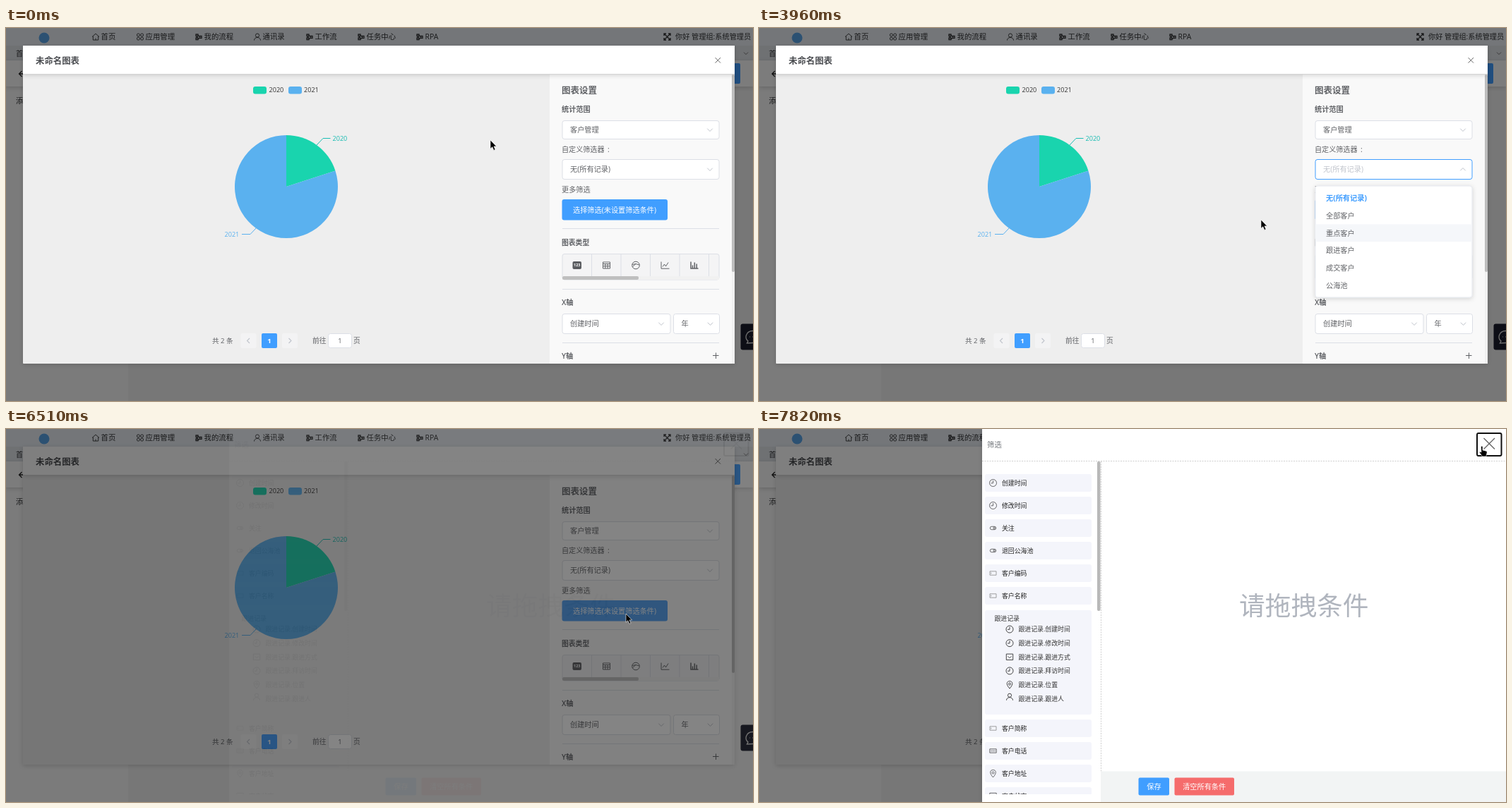
These frames come from a looping animation (1058x529 px, 8000 ms). An HTML page:

```html
<!DOCTYPE html>
<html lang="zh-CN">
<head>
<meta charset="utf-8">
<title>图表设置</title>
<style>
html, body { margin: 0; width: 100%; height: 100%; overflow: hidden; background: #fff; }
svg { display: block; width: 100%; height: 100%; }
text { font-family: "Open Sans", "Noto Sans CJK SC", "Noto Sans CJK", sans-serif; white-space: pre; }
</style>
</head>
<body>
<svg id="stage" viewBox="0 0 1058 529"></svg>
<script>
const LOOP = 8000;
const BLUE = '#409eff', INK = '#303133', TEXT = '#606266', LINE = '#dcdfe6', PALE = '#c0c4cc';

// Markup helpers: text is placed by its vertical centre
const text = (x, cy, size, str, fill = TEXT, more = '') =>
  `<text x="${x}" y="${cy + size * 0.37}" font-size="${size}" fill="${fill}" ${more}>${str}</text>`;
const rect = (x, y, w, h, fill, more = '') =>
  `<rect x="${x}" y="${y}" width="${w}" height="${h}" fill="${fill}" ${more}/>`;
const path = (d, stroke, width = 1, more = '') =>
  `<path d="${d}" fill="none" stroke="${stroke}" stroke-width="${width}" ${more}/>`;
const at = (x, y, body, more = '') => `<g transform="translate(${x} ${y})" ${more}>${body}</g>`;
const BOLD = 'font-weight="600"', MID = 'text-anchor="middle"';

const circle = (x, y, r) => `M${x - r} ${y}a${r} ${r} 0 1 0 ${2 * r} 0a${r} ${r} 0 1 0 ${-2 * r} 0`;
const box = (x, y, w, h) => `M${x} ${y}h${w}v${h}h${-w}z`;

// Line icons drawn around 0,0
const icons = {
  home: 'M-5 0L0 -4.5L5 0M-3.7 -1V4.5H3.7V-1M0 4.5V2',
  grid: circle(-2.6, -2.6, 2) + circle(2.6, -2.6, 2) + circle(-2.6, 2.6, 2) + circle(2.6, 2.6, 2),
  flow: 'M-4 -3.5h3v2.5h-3zM-4 1.5h3v2.5h-3zM-2.5 -1v3M1.5 -1h2.5v2.8h-2.5zM-1 -2L2 0M-1 3L2 1.5',
  user: circle(0, -2, 2.6) + 'M-4.5 5C-4.5 -.4 4.5 -.4 4.5 5',
  clock: circle(0, 0, 5) + 'M0 -3.3V.3H-3',
  toggle: 'M-2 -2.2H2a2.2 2.2 0 0 1 0 4.4H-2a2.2 2.2 0 0 1 0 -4.4' + circle(1.6, 0, 1.2),
  input: box(-4.5, -2.7, 9, 5.4) + 'M-2.8 -1V1',
  phone: box(-4.7, -2.7, 9.4, 5.4) + 'M-2.5 -1.2V1.2M0 -1.2V1.2M2.5 -1.2V1.2',
  pin: 'M0 5.5C-6 -1 -4 -5 0 -5S6 -1 0 5.5z' + circle(0, -1, 1.5),
  choice: box(-4.7, -4.2, 9.4, 8.4) + 'M-2.5 -1L0 1.5L2.5 -1',
  table: box(-5, -4.5, 10, 9) + 'M-5 -2H5M-5 1.2H5M-1.7 -2V4.5M1.7 -2V4.5',
  pie: circle(0, 0, 5.3) + 'M-5 -1L0 -2L5 -.5M-4.5 2L0 -2',
  chart: 'M-5.5 -5V4.7H6M-3.5 2L-1 -1.5L1 1.5L4.5 -4',
  bars: 'M-5 -5V4.5H5.5M-2.5 4V0M.3 4V-4M3.2 4V-2',
  expand: 'M-4.5 -4.5L4.5 4.5M4.5 -4.5L-4.5 4.5M-4.5 -1.5V-4.5H-1.5M1.5 -4.5H4.5V-1.5M4.5 1.5V4.5H1.5M-1.5 4.5H-4.5V1.5'
};
const icon = (name, x, y, color, width = 0.9) => at(x, y, path(icons[name], color, width));
const chevron = (x, y, id = '') =>
  at(x, y, `<path ${id} d="M-3.7 -1.8L0 2L3.7 -1.8" fill="none" stroke="${PALE}"/>`);
const select = (x, y, w, h, label) =>
  rect(x, y, w, h, '#fff', `stroke="${LINE}" rx="3"`) + text(x + 11, y + h / 2, 10.2, label) +
  chevron(x + w - 13, y + h / 2);
const rule = y => path(`M788 ${y}H1010`, LINE);

function pageMarkup() {
  const nav = [['home', 127, '首页'], ['grid', 190, '应用管理'], ['flow', 273, '我的流程'], ['user', 356, '通讯录'],
    ['flow', 430, '工作流'], ['flow', 503, '任务中心'], ['flow', 586, 'RPA']];
  return rect(0, 0, 1058, 529, '#f0f0f0') + rect(0, 84, 173, 445, '#f7f7f7') +
    rect(0, 0, 1058, 25, '#e9eef4') + rect(0, 25, 1058, 21, '#dfe3e8') +
    rect(0, 46, 1058, 37, '#fafafa', 'filter="url(#soft)"') +
    '<circle cx="54" cy="14" r="7.5" fill="#58a4e6"/>' +
    nav.map(([name, x, label]) => icon(name, x, 12.5, INK, name === 'flow' ? 1.3 : 0.9) +
      text(x + 7.5, 12.5, 10.4, label, INK)).join('') +
    icon('expand', 936.5, 12.5, INK, 1.3) + text(948, 12.5, 10.2, '你好 管理组:系统管理员', INK) +
    text(14, 36, 10, '首页', INK) + path('M26 65H19M22.5 61L18.5 65L22.5 69', '#222', 1.3) +
    text(14, 103.5, 10.2, '添加', INK) + rect(990, 50, 50, 29, BLUE, 'rx="2"') +
    path('M1045 34.5L1048 37.5L1051 34.5', '#777') +
    rect(1040.5, 419.5, 24, 37, '#1b1c2c', 'rx="3"') +
    path('M1058 429.5C1047 429.5 1046 441 1051 444L1049.5 447L1058 446.5M1053 438h.6M1057 438h.6', '#ddd', 1.4);
}

function chartMarkup() {
  const cx = 397, cy = 225, r = 73, a = Math.PI * 0.4;
  const ex = cx + r * Math.sin(a), ey = cy - r * Math.cos(a);
  const slice = (big, x1, y1, x2, y2, fill) =>
    `<path d="M${cx} ${cy}L${x1} ${y1}A${r} ${r} 0 ${big} 1 ${x2} ${y2}z" fill="${fill}"/>`;
  const pager = (x, d) => rect(x, 433, 22, 21, '#f3f3f4', 'rx="2"') + path(d, PALE, 1.1);
  return rect(350, 83, 19, 10.5, '#19d4ae', 'rx="3"') + text(372.5, 87.5, 9.1, '2020', '#333') +
    rect(400, 83, 19, 10.5, '#5ab1ef', 'rx="3"') + text(422, 87.5, 9.1, '2021', '#333') +
    slice(0, cx, cy - r, ex, ey, '#19d4ae') + slice(1, ex, ey, cx, cy - r, '#5ab1ef') +
    path('M440 166L449 156.5H459.5', '#19bdb4') + text(462.5, 156.5, 9.1, '2020', '#17bcb2') +
    path('M354 284L346 292.5H334', '#5ab1ef') + text(309.5, 292.5, 9.1, '2021', '#5ab1ef') +
    text(292, 443.5, 9.6, '共 2 条') + pager(332.5, 'M345 440L341.5 443.5L345 447') +
    pager(391, 'M400.5 440L404 443.5L400.5 447') + rect(362, 433, 22, 21, BLUE, 'rx="2"') +
    text(373, 443.5, 9.6, '1', '#fff', MID + ' font-weight="700"') + text(434, 443.5, 9.8, '前往') +
    rect(456.5, 433.5, 33, 20, '#fff', `rx="3" stroke="${LINE}"`) + text(473, 443.5, 9.4, '1', TEXT, MID) +
    text(492, 443.5, 9.8, '页');
}

function panelMarkup() {
  const tools = ['table', 'pie', 'chart', 'bars'];
  return rect(770, 66, 258, 410, '#f9f9f9') + rect(1028, 66, 4, 410, '#f1f1f1') +
    rect(1028, 66, 4, 280, '#bdbdbd', 'rx="2"') +
    text(787, 88.5, 12.5, '图表设置', TEXT, BOLD) +
    text(787, 115, 10.2, '统计范围', TEXT, BOLD) + select(788, 131.5, 222, 26, '客户管理') +
    text(787, 172, 10.1, '自定义筛选器') + text(852, 172, 10.1, ':') +
    rect(788, 186.5, 222, 28, '#fff', `id="field" stroke="${LINE}" rx="3"`) +
    text(799, 200.5, 10.2, '无(所有记录)', TEXT, 'id="value"') + chevron(997, 200.5, 'id="arrow"') +
    rect(798.5, 194.5, 1, 12.5, '#444', 'id="caret"') +
    text(787, 229.5, 10.2, '更多筛选') + rect(787.5, 243, 149.5, 29.5, BLUE, 'id="pick" rx="3"') +
    text(862, 258, 10.2, '选择筛选(未设置筛选条件)', '#fff', MID + ' font-weight="500"') +
    rule(284.5) + text(787, 304, 9.8, '图表类型', TEXT, BOLD) +
    rect(788, 320.5, 222, 36.5, '#f4f4f5', `rx="3" stroke="${LINE}"`) +
    [829.5, 871, 912.5, 954, 995.5].map(x => path(`M${x} 321V352`, LINE)).join('') +
    rect(802.5, 331, 12.5, 11, '#5a5c60', 'rx="2"') + text(808.7, 336.5, 5.4, '123', '#fff', MID + ' font-weight="700"') +
    tools.map((name, i) => icon(name, 850.5 + 41.5 * i, 336.5, TEXT, name === 'bars' ? 1.5 : 1)).join('') +
    rect(788, 352, 222, 5, '#f1f1f1') + rect(788, 352, 108, 5, '#bfbfbf', 'rx="2"') +
    rule(370.5) + text(787, 389.5, 10.2, 'X轴', TEXT, BOLD) +
    select(788, 405.5, 153, 28, '创建时间') + select(945.5, 405.5, 65, 28, '年') +
    rule(446.5) + text(787, 465.5, 10.2, 'Y轴', TEXT, BOLD) + path('M1001 464.5H1009.5M1005.5 460.5V469', TEXT);
}

function listMarkup() {
  const names = ['无(所有记录)', '全部客户', '重点客户', '跟进客户', '成交客户', '公海池'];
  return rect(0, 0, 222, 158, '#fff', 'rx="3" stroke="#e4e7ed" filter="url(#soft)"') +
    rect(0.5, 4.8, 221, 24.8, '#f5f7fa', 'id="hot"') +
    names.map((s, i) => text(15, 17.2 + 24.8 * i, 10.2, s, i ? TEXT : BLUE, i ? '' : 'font-weight="700"')).join('');
}

function drawerMarkup() {
  const rows = [['clock', 76.5, '创建时间'], ['clock', 108.5, '修改时间'], ['toggle', 140.5, '关注'],
    ['toggle', 172.5, '退回公海池'], ['input', 204.5, '客户编码'], ['input', 236.5, '客户名称'],
    ['input', 424.5, '客户简称'], ['phone', 456.5, '客户电话'], ['pin', 488.5, '客户地址'], ['choice', 520.5, '客户状态']];
  const group = [['clock', '创建时间'], ['clock', '修改时间'], ['choice', '跟进方式'],
    ['clock', '拜访时间'], ['pin', '位置'], ['user', '跟进人']];
  const groupBody = color => text(17.5, 269, 8.9, '跟进记录', color) + group.map(([name, s], i) => {
    const y = 284 + 19.65 * i;
    return icon(name, 39, name === 'user' ? y - 2.5 : y, color) + text(51.5, y, 8.9, '跟进记录.' + s, color);
  }).join('');
  return rect(0, 0, 742, 529, '#fff', 'filter="url(#soft)"') + text(7, 22.5, 10.4, '筛选', '#72767b') +
    path('M0 45.5H742', '#cfcfcf', 1, 'stroke-dasharray="2 1.5"') +
    '<g clip-path="url(#rows)">' + rows.map(([name, y, s]) => rect(4, y - 12.5, 151, 25, '#f4f5fb', 'rx="3"') +
      icon(name, 15.5, y, name === 'input' ? '#8a8a8a' : '#444', 0.8) + text(28, y, 8.9, s, '#222')).join('') + '</g>' +
    `<g id="calm">${rect(4, 257, 151, 148, '#f4f5fb', 'rx="3"')}${groupBody('#333')}</g>` +
    `<g id="lit">${rect(4.5, 256.5, 150, 148, '#eef1fa', 'rx="3" stroke="#8cc4fb" stroke-dasharray="2.5 1.5"')}${groupBody(BLUE)}</g>` +
    rect(163, 46, 4.5, 212, '#b8b8b8', 'rx="2"') +
    path('M168.5 46V486', '#cfcfcf', 1, 'stroke-dasharray="2 1.5"') +
    rect(168, 485.5, 574, 44, '#f2f4f4') +
    text(364, 250, 36.7, '请拖拽条件', '#b0b5be') +
    rect(221.5, 494.5, 43.5, 25, BLUE, 'rx="2"') + text(243.5, 507.5, 10.2, '保存', '#fff', MID + ' font-weight="500"') +
    rect(272.5, 494.5, 84.5, 25, '#f56c6c', 'rx="2"') + text(314.7, 507.5, 10.2, '清空所有条件', '#fff', MID + ' font-weight="500"') +
    rect(701, 6, 34.5, 32, '#fff', 'rx="2" stroke="#101010" stroke-width="2"') +
    path('M710.5 13L726 28.5M726 13L710.5 28.5', '#666', 1.4);
}

const pointers =
  '<path id="tip" d="M0 0V12.2L2.8 9.7L4.9 14.4L7 13.4L5 8.9H8.6z" fill="#000" stroke="#fff" stroke-width=".6"/>' +
  '<path id="hand" d="M1.5 1Q3 -.5 4 1V6L9 7.2Q10.5 8 10 10L8.8 15H3.5L-.5 9.5Q0 7.5 2 9z" fill="#000" stroke="#fff" stroke-width=".6"/>' +
  at(775.5, 190, '<path d="M0 -8L8 0L0 8L-8 0z" fill="#fff"/>' +
    path('M0 -7.3L7.3 0L0 7.3L-7.3 0zM-6 0H6M0 -6V6M-3 -3L3 3M3 -3L-3 3', '#111', 1) +
    '<circle r="1.6" fill="#111"/>', 'id="drag"');

const stage = document.getElementById('stage');
stage.innerHTML = `<defs>
  <filter id="soft" x="-10%" y="-30%" width="120%" height="160%"><feDropShadow dx="0" dy="1.5" stdDeviation="3" flood-opacity=".16"/></filter>
  <clipPath id="dialogClip"><rect x="24" y="25" width="1008" height="451"/></clipPath>
  <clipPath id="rows"><rect x="0" y="46" width="168" height="472"/></clipPath></defs>` +
  pageMarkup() + rect(0, 0, 1058, 529, '#000', 'id="under" opacity=".5"') +
  rect(24, 25, 1008, 451, '#eee', 'rx="1" filter="url(#soft)"') +
  '<g clip-path="url(#dialogClip)">' + chartMarkup() + panelMarkup() +
  rect(24, 25, 1008, 40.5, '#fff', 'filter="url(#soft)"') + path('M24 65.5H1032', '#d4d4d4') +
  text(42, 46, 12.4, '未命名图表', '#4a4c50', BOLD) +
  path('M1004.5 42L1012 49.5M1012 42L1004.5 49.5', '#666') + '</g>' +
  `<g id="list">${listMarkup()}</g>` + rect(0, 0, 1058, 529, '#000', 'id="over" opacity=".5"') +
  `<g id="drawer">${drawerMarkup()}</g>` + pointers;

const el = {};
stage.querySelectorAll('[id]').forEach(n => { el[n.id] = n; });
const set = (n, name, v) => n.setAttribute(name, v);
const show = (n, on) => set(n, 'visibility', on ? 'visible' : 'hidden');

// Pointer moves: start, end, steps, then [progress, x, y] points
const moves = [
  [590, 1140, 8, [0.3, 668, 174], [1, 768, 200]],
  [1300, 1620, 5, [1, 882, 196]],
  [1930, 2640, 10, [0.2, 882, 198], [0.5, 888, 219], [1, 869, 286]],
  [2940, 3700, 11, [0.5, 832, 312], [1, 796, 290]],
  [3790, 4100, 5, [0.6, 711, 272], [1, 692, 272]],
  [4390, 5170, 11, [0.2, 692, 272], [0.8, 938, 237], [1, 953, 262]],
  [5730, 6190, 7, [1, 890, 263]],
  [6330, 6510, 3, [0.667, 882, 263], [1, 878, 262]],
  [6610, 7070, 6, [1, 867, 250]],
  [7150, 7820, 10, [0.6, 968, 110], [1, 1021, 24]]
];

function pointer(t) {
  let p = [686, 159];
  for (const [from, to, steps, ...points] of moves) {
    if (t < from) break;
    const gap = (to - from) / (steps - 1);
    const u = Math.min(1, (Math.floor((t - from + 6) / gap) + 1) / steps);
    let last = [0, ...p];
    for (const q of points) {
      const k = Math.max(0, Math.min(1, (u - last[0]) / (q[0] - last[0])));
      p = [last[1] + (q[1] - last[1]) * k, last[2] + (q[2] - last[2]) * k];
      if (u <= q[0]) break;
      last = q;
    }
  }
  return p;
}

// Drawer: time, left edge, opacity
const slides = [[0, 316, 0], [6510, 316, 0.04], [6610, 839, 0.5], [6710, 428, 0.95], [6820, 328, 1], [6930, 316, 1]];
const clamp = v => Math.max(0, Math.min(1, v));
const ease = v => 1 - (1 - clamp(v)) ** 3;

function draw(t) {
  const [x, y] = pointer(t);
  const open = t >= 1930 && t < 4390;
  const grow = open ? ease((t - 1930) / 300) : t >= 4390 ? 1 - ease((t - 4390) / 300) : 0;
  const overField = x >= 788 && x <= 1010 && y >= 186 && y <= 215;
  set(el.field, 'stroke', open ? BLUE : overField ? PALE : LINE);
  set(el.value, 'fill', open ? PALE : TEXT);
  set(el.arrow, 'transform', `rotate(${180 * grow})`);
  show(el.caret, open && (t - 1930) % 1000 < 500 && t < 3790);
  show(el.list, grow > 0);
  set(el.list, 'opacity', grow);
  set(el.list, 'transform', `translate(788 224) scale(1 ${grow})`);
  const row = t >= 3700 ? 2 : t < 1930 ? 0 : Math.max(0, Math.min(5, Math.floor((y - 228.8) / 24.8)));
  set(el.hot, 'y', 4.8 + 24.8 * row);
  const overPick = x >= 788 && x <= 937 && y >= 243 && y <= 272;
  set(el.pick, 'fill', overPick && t > 5000 ? '#4f9ff3' : BLUE);

  // The shade moves from below the dialog to above it
  const raised = t >= 6510;
  show(el.under, !raised);
  show(el.over, raised);
  const [, left, alpha] = slides.filter(s => s[0] <= t).pop();
  set(el.drawer, 'transform', `translate(${left} 0)`);
  set(el.drawer, 'opacity', alpha);
  const lit = t >= 6610 && t < 6930;
  set(el.lit, 'display', lit ? 'inline' : 'none');
  set(el.calm, 'display', lit ? 'none' : 'inline');

  const drag = t >= 6610 && t < 6820, hand = x > 1015 && y < 39;
  show(el.drag, drag);
  show(el.tip, !drag && !hand);
  show(el.hand, hand);
  set(el.tip, 'transform', `translate(${x} ${y})`);
  set(el.hand, 'transform', `translate(${x} ${y})`);
}

const began = performance.now();
function tick() {
  draw((performance.now() - began) % LOOP);
  requestAnimationFrame(tick);
}
tick();
</script>
</body>
</html>
```
